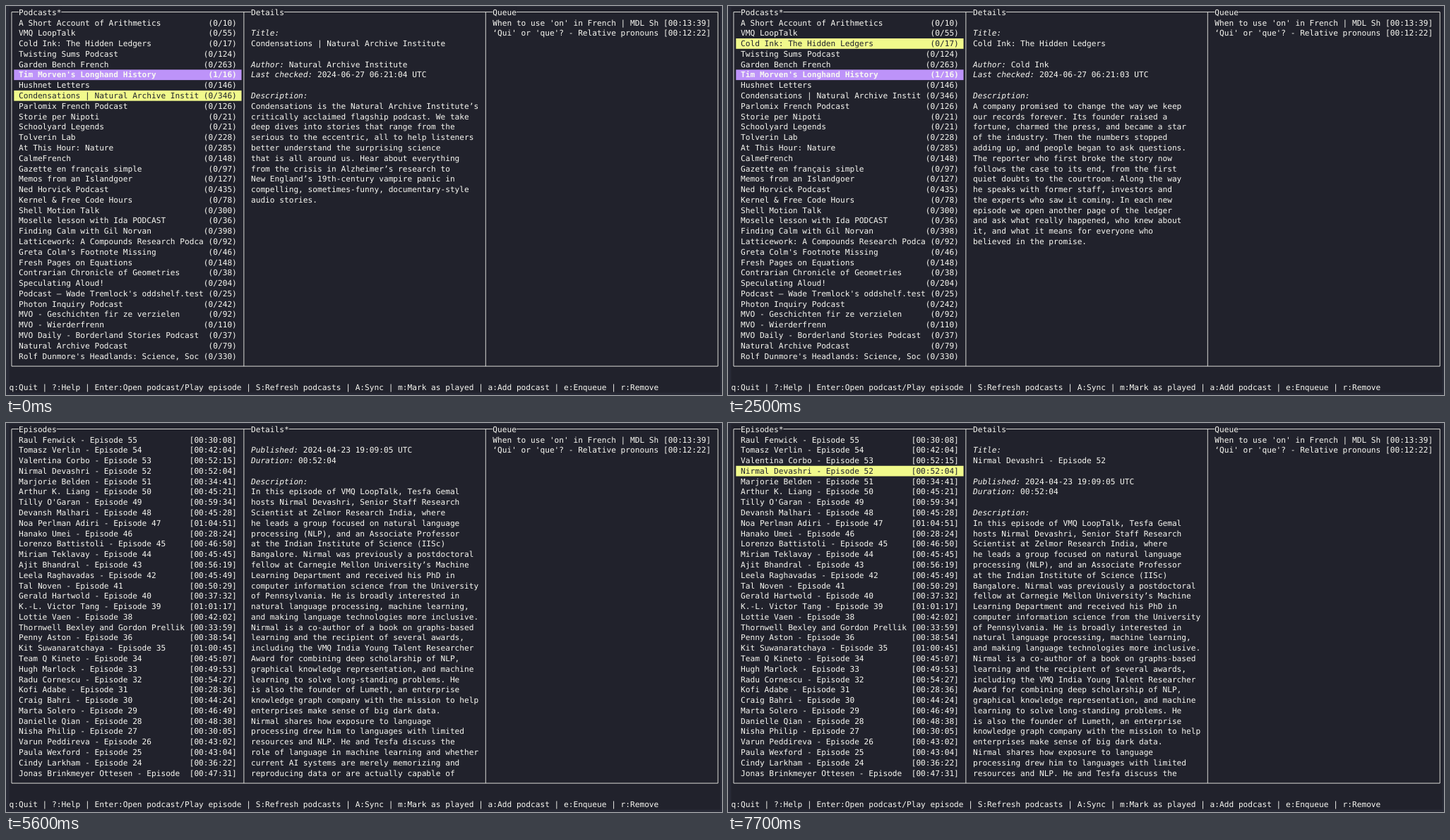
An HTML page with a canvas that plays this animation: 1014 px wide and 552 px high, repeating every 8000 ms.

```html
<!DOCTYPE html>
<html lang="en">
<head>
<meta charset="utf-8">
<title>Podcast terminal</title>
<style>
html, body { margin: 0; width: 100%; height: 100%; overflow: hidden; background: #282a36; }
canvas { display: block; }
</style>
</head>
<body>
<canvas id="stage" width="1014" height="552"></canvas>
<script>
const ctx = document.getElementById('stage').getContext('2d');
const LOOP = 8000, LEFT = 4.6, TOP = 1.65, CELL = 6.713, ROW = 14.78, ROWS = 33;
const BASELINE = 11.15, LINE = 0.85;
const FG = '#f8f8f2', BG = '#21222c', YELLOW = '#f1fa8c', PURPLE = '#bd93f9';
const FONT = '11.15px "DejaVu Sans Mono", monospace';

const parse = text => text.trim().split('\n').map(line => line.split('/ '));

const podcasts = parse(`
A Short Account of Arithmetics/ (0/10)
VMQ LoopTalk/ (0/55)
Cold Ink: The Hidden Ledgers/ (0/17)
Twisting Sums Podcast/ (0/124)
Garden Bench French/ (0/263)
Tim Morven's Longhand History/ (1/16)
Hushnet Letters/ (0/146)
Condensations | Natural Archive Institute/ (0/346)
Parlomix French Podcast/ (0/126)
Storie per Nipoti/ (0/21)
Schoolyard Legends/ (0/21)
Tolverin Lab/ (0/228)
At This Hour: Nature/ (0/285)
CalmeFrench/ (0/148)
Gazette en français simple/ (0/97)
Memos from an Islandgoer/ (0/127)
Ned Horvick Podcast/ (0/435)
Kernel & Free Code Hours/ (0/78)
Shell Motion Talk/ (0/300)
Moselle lesson with Ida PODCAST/ (0/36)
Finding Calm with Gil Norvan/ (0/398)
Latticework: A Compounds Research Podcast/ (0/92)
Greta Colm's Footnote Missing/ (0/46)
Fresh Pages on Equations/ (0/148)
Contrarian Chronicle of Geometries/ (0/38)
Speculating Aloud!/ (0/204)
Podcast – Wade Tremlock's oddshelf.test/ (0/25)
Photon Inquiry Podcast/ (0/242)
MVO - Geschichten fir ze verzielen/ (0/92)
MVO - Wierderfrenn/ (0/110)
MVO Daily - Borderland Stories Podcast/ (0/37)
Natural Archive Podcast/ (0/79)
Rolf Dunmore's Headlands: Science, Society/ (0/330)`);

const episodes = parse(`
Raul Fenwick/ 00:30:08
Tomasz Verlin/ 00:42:04
Valentina Corbo/ 00:52:15
Nirmal Devashri/ 00:52:04
Marjorie Belden/ 00:34:41
Arthur K. Liang/ 00:45:21
Tilly O'Garan/ 00:59:34
Devansh Malhari/ 00:45:28
Noa Perlman Adiri/ 01:04:51
Hanako Umei/ 00:28:24
Lorenzo Battistoli/ 00:46:50
Miriam Teklavay/ 00:45:45
Ajit Bhandral/ 00:56:19
Leela Raghavadas/ 00:45:49
Tal Noven/ 00:50:29
Gerald Hartwold/ 00:37:32
K.-L. Victor Tang/ 01:01:17
Lottie Vaen/ 00:42:02
Thornwell Bexley and Gordon Prellik/ 00:33:59
Penny Aston/ 00:38:54
Kit Suwanaratchaya/ 01:00:45
Team Q Kineto/ 00:45:07
Hugh Marlock/ 00:49:53
Radu Cornescu/ 00:54:27
Kofi Adabe/ 00:28:36
Craig Bahri/ 00:44:24
Marta Solero/ 00:46:49
Danielle Qian/ 00:48:38
Nisha Philip/ 00:30:05
Varun Peddireva/ 00:43:02
Paula Wexford/ 00:43:04
Cindy Larkham/ 00:36:22
Jonas Brinkmeyer Ottesen/ 00:47:31`)
  .map(([name, time], i) => [`${name} - Episode ${55 - i}`, `[${time}]`]);

// Keyed by list index: author, seconds of the last check, description.
const podcastInfo = {
  1: ['VMQ', '03', `The VMQ LoopTalk series features interviews
with researchers, practitioners, and innovators
who are at the intersection of research and
practice. In each episode, our hosts talk with
computing professionals, and learn what drove the
guest to enter the field, the lessons learned
along the way, and their own visions for
the future of computing.`],
  2: ['Cold Ink', '03', `A company promised to change the way we keep
our records forever. Its founder raised a
fortune, charmed the press, and became a star
of the industry. Then the numbers stopped
adding up, and people began to ask questions.
The reporter who first broke the story now
follows the case to its end, from the first
quiet doubts to the courtroom. Along the way
he speaks with former staff, investors and
the experts who saw it coming. In each new
episode we open another page of the ledger
and ask what really happened, who knew about
it, and what it means for everyone who
believed in the promise.`],
  3: ['Twisting Sums', '03', `Twisting Sums is a podcast that aims to make
mathematics accessible to everyone, and to make
it enjoyable. Every other week, topics such as
chaos, forbidden formulas, and more will be
covered in detail. If you have ever wondered
how a number can be larger than infinity, or
why some shapes cannot be drawn at all, this
is the show for you.
We talk with authors, teachers and researchers
about the ideas which changed their lives, and
we try to explain each one without a board or
a piece of chalk. No background is needed to
follow along, only some patience and a wish to
see the world in a slightly different way.
New episodes appear on Sundays, with extra
material for listeners who want to go deeper
into the subject. Send us your questions and
we will do our best to answer them.`],
  4: ['Garden Bench Languages', '03', `Learn French in garden-bench lessons from the
Audio Verbis Network. In each lesson we'll focus
on the language you need to know and before
long you'll be making yourself understood with
native French speakers. Season 1 lessons are for
absolute beginners, and the courses increase in
difficulty as the seasons progress. 386357
 Hosted on Ondax. See onda.test/privacy for more
information.`],
  5: ['Tim Morven', '04', `In "Longhand History" the writer and amateur
historian Tim Morven takes his unusual way of
thinking and applies it to the past. Was the
old world as harsh as we believe? How would
we have fared under the same conditions? This
isn't academic history, and Morven isn't a
trained historian, but the mix of high drama,
careful narration and strange questions has
brought the past to life for many listeners
who never enjoyed the subject when they were
still at school.`],
  6: ['Hushnet', '04', `Explore true stories of the hidden side of the
network. Tales of intruders, breaches, shadow
agencies, and all the things that dwell on the
unseen parts of the internet.`],
  7: ['Natural Archive Institute', '04', `Condensations is the Natural Archive Institute’s
critically acclaimed flagship podcast. We take
deep dives into stories that range from the
serious to the eccentric, all to help listeners
better understand the surprising science
that is all around us. Hear about everything
from the crisis in Alzheimer’s research to
New England’s 19th-century vampire panic in
compelling, sometimes-funny, documentary-style
audio stories.`],
  8: ['Parlomix', '04', `Captivating true stories to improve your French
listening and expand your perspective on the
world. Through easy-to-understand French with
English narration, these are more than language
lessons, they're life lessons.`],
};

// Keyed by list index: publication time, description.
const episodeInfo = {
  0: ['2024-06-06 16:12:14', `In this episode of VMQ LoopTalk, our
special guest host Brent Lockerman (of The
Quiethallways Podcast) welcomes VMQ Fellow
Raul Fenwick, the Walter Hurst Family
Preeminence Endowed Professor and Chair of the
Computer & Information Science & Engineering
Department at the University of Florida where
he leads the Designing for Common Good Lab.
The lab’s innovations include open-source
voting technology to help make elections more
secure, accessible, and usable; making voting
technologies more transparent; increasing
fairness and reducing bias in ML algorithms used
in admissions and hiring decisions; and reducing
conflicts during traffic stops. Fenwick’s many
honors and recognitions include the Metropolitan
Prize for Leadership in Science, Mathematics,
and Engineering Tutorship, the DLN E. Piet
Osterveld Award, and the Republic Medal of
Machinery and Imagination (RMMI).
Raul shares with Brent his surprise at being
nominated for the RMMI, which he received in
2023 from President Lou Marek for pioneering a
universal voting system that makes voting more
reliable and accessible for everyone and for`],
  1: ['2024-05-22 15:30:41', `In this episode of VMQ LoopTalk, our host
welcomes Tomasz Verlin, a professor who has
spent his career on neural networks and the
methods that let machines learn from data. His
work on representation learning helped to make
the current progress in speech, vision and
language possible, and it has been recognized
with some of the highest honors in the field.
Tomasz traces his path into computing, from
the first home computer he shared with his
brother to his years as a graduate student,
when few people believed in neural networks.
He explains how a small group of researchers
kept the idea alive, what made it succeed at
last, and why he did not expect the speed of
the changes that followed.
The conversation then turns to the risks of
powerful systems. Tomasz describes why he has
shifted his own research toward safety, what
governments could do to prepare, and how the
public can take part in the discussion. He
also talks about uses of machine learning for
the climate, for medicine and for discovery in
the sciences, and shares advice for students
who are about to begin their own research.`],
  2: ['2024-05-08 17:45:22', `In this episode of VMQ LoopTalk, our host is
joined by Valentina Corbo, a researcher who
leads a global program on the ethics of
artificial intelligence. Her interests include
constraint reasoning, preferences, and social
choice, and she has written many articles on
how groups of people and machines can arrive
at good decisions together.
Valentina describes growing up with a love of
mathematics, her choice to study computing at
a time when it was a new subject, and her move
from university life to industry. She explains
how working with people from many disciplines
changed her view of what the technology should
do and of the questions that must be asked
before a system is put to use.
The discussion covers fairness, transparency
and the value of explaining automated choices
to those who are affected by them. Valentina
outlines how companies can build an internal
board to review their projects, which lessons
she has learned from that work, and how rules
and standards may develop. She also considers
thinking fast and slow in machines, and what
she hopes the next ten years will bring to`],
  3: ['2024-04-23 19:09:05', `In this episode of VMQ LoopTalk, Tesfa Gemal
hosts Nirmal Devashri, Senior Staff Research
Scientist at Zelmor Research India, where
he leads a group focused on natural language
processing (NLP), and an Associate Professor
at the Indian Institute of Science (IISc)
Bangalore. Nirmal was previously a postdoctoral
fellow at Carnegie Mellon University’s Machine
Learning Department and received his PhD in
computer information science from the University
of Pennsylvania. He is broadly interested in
natural language processing, machine learning,
and making language technologies more inclusive.
Nirmal is a co-author of a book on graphs-based
learning and the recipient of several awards,
including the VMQ India Young Talent Researcher
Award for combining deep scholarship of NLP,
graphical knowledge representation, and machine
learning to solve long-standing problems. He
is also the founder of Lumeth, an enterprise
knowledge graph company with the mission to help
enterprises make sense of big dark data.
Nirmal shares how exposure to language
processing drew him to languages with limited
resources and NLP. He and Tesfa discuss the
role of language in machine learning and whether
current AI systems are merely memorizing and
reproducing data or are actually capable of
understanding. He also talks about his recent
focus on inclusive and equitable language
technology development through multilingual-
multimodal Large Language Modeling, including
Project Orsel. They discuss current limitations
in machine learning in a world with more than
7,000 languages, as well as data scarcity and
the challenges of building useful tools for
communities whose languages have rarely been
written down or digitized.`],
};

const queue = [
  ["When to use 'on' in French | MDL Show", '[00:13:39]'],
  ["‘Qui' or 'que'? - Relative pronouns", '[00:12:22]'],
];
const help = 'q:Quit | ?:Help | Enter:Open podcast/Play episode | S:Refresh podcasts | ' +
  'A:Sync | m:Mark as played | a:Add podcast | e:Enqueue | r:Remove';

const UP_TIMES = [1200, 1500, 2000, 2200, 2500, 3000];
const DOWN_TIMES = [4000, 4200, 4400];
const SCROLL_TIMES = [4900, 5400, 5600, 5800, 5900, 6100, 6400, 6500, 6600, 6900, 7100, 7200, 7400];
const passed = (times, t) => times.filter(time => time <= t).length;

function stateAt(t) {
  const inEpisodes = t >= 3500;
  const inDetails = t >= 4700 && t < 7700;
  const podcast = t >= 300 && t < 1000 ? 8 : 7 - passed(UP_TIMES, t);
  return {
    inEpisodes, inDetails,
    selected: inEpisodes ? passed(DOWN_TIMES, t) : podcast,
    scroll: inDetails ? passed(SCROLL_TIMES, t) : 0,
  };
}

const cellX = col => LEFT + col * CELL;
const rowY = row => TOP + row * ROW;

function write(text, col, row, color = FG, style = '') {
  ctx.font = `${style} ${FONT}`;
  ctx.fillStyle = color;
  [...text].forEach((char, i) => {
    if (char !== ' ') ctx.fillText(char, cellX(col + i), rowY(row) + BASELINE);
  });
}

function fillCells(col, row, cols, rows, color) {
  ctx.fillStyle = color;
  ctx.fillRect(cellX(col), rowY(row), cols * CELL, rows * ROW);
}

function writeEntry([name, info], col, row, color, style) {
  write(name.slice(0, 45 - info.length), col, row, color, style);
  write(info, col + 46 - info.length, row, color, style);
}

// Box-drawing lines run through the middle of their cells.
function drawFrame(titles) {
  const [left, right] = [cellX(0.5), cellX(149.5)];
  const [top, bottom] = [rowY(0.47), rowY(34.47)];
  ctx.fillStyle = FG;
  for (const x of [left, cellX(49.5), cellX(100.5), right]) {
    ctx.fillRect(x - LINE / 2, top, LINE, bottom - top);
  }
  for (const y of [top, bottom]) ctx.fillRect(left, y - LINE / 2, right - left, LINE);
  titles.forEach((title, i) => {
    const col = [2, 51, 102][i];
    fillCells(col, 0, title.length, 1, BG);
    write(title, col, 0);
  });
}

function drawList(entries, selected) {
  entries.forEach((entry, i) => {
    const row = i + 1;
    const unplayed = entry[1].startsWith('(1');
    const active = i === selected;
    if (active || unplayed) fillCells(1, row, 48, 1, active ? YELLOW : PURPLE);
    writeEntry(entry, 2, row, active ? BG : FG, unplayed ? 'bold' : '');
  });
}

function detailLines({ inEpisodes, selected }) {
  let title, meta, text;
  if (inEpisodes) {
    const [published, body] = episodeInfo[selected];
    const [name, duration] = episodes[selected];
    title = name;
    meta = [`Published: ${published} UTC`, `Duration: ${duration.slice(1, -1)}`];
    text = body;
  } else {
    const [author, seconds, body] = podcastInfo[selected];
    title = podcasts[selected][0];
    meta = [`Author: ${author}`, `Last checked: 2024-06-27 06:21:${seconds} UTC`];
    text = body;
  }
  return ['', 'Title:', title, '', ...meta, '', 'Description:', ...text.split('\n')];
}

function drawDetails(state) {
  const labelled = [1, 4, 5, 7];
  detailLines(state).slice(state.scroll, state.scroll + ROWS).forEach((line, i) => {
    const split = labelled.includes(i + state.scroll) ? line.indexOf(':') + 1 : 0;
    write(line.slice(0, split), 51, i + 1, FG, 'italic');
    write(line.slice(split), 51 + split, i + 1);
  });
}

function draw(state) {
  const { inEpisodes, inDetails, selected } = state;
  ctx.fillStyle = '#282a36';
  ctx.fillRect(0, 0, 1014, 552);
  fillCells(0, 0, 150, 37, BG);
  const listTitle = inEpisodes ? 'Episodes' : 'Podcasts';
  drawFrame([listTitle + (inDetails ? '' : '*'), 'Details' + (inDetails ? '*' : ''), 'Queue']);
  drawList(inEpisodes ? episodes : podcasts, inDetails ? -1 : selected);
  drawDetails(state);
  queue.forEach((entry, i) => writeEntry(entry, 102, i + 1));
  write(help, 0, 36);
}

let start, shown;
function tick(now) {
  start ??= now;
  const state = stateAt((now - start) % LOOP);
  const key = JSON.stringify(state);
  if (key !== shown) draw(state);
  shown = key;
  requestAnimationFrame(tick);
}

ctx.textRendering = 'geometricPrecision';
draw(stateAt(0));
requestAnimationFrame(tick);
</script>
</body>
</html>
```
